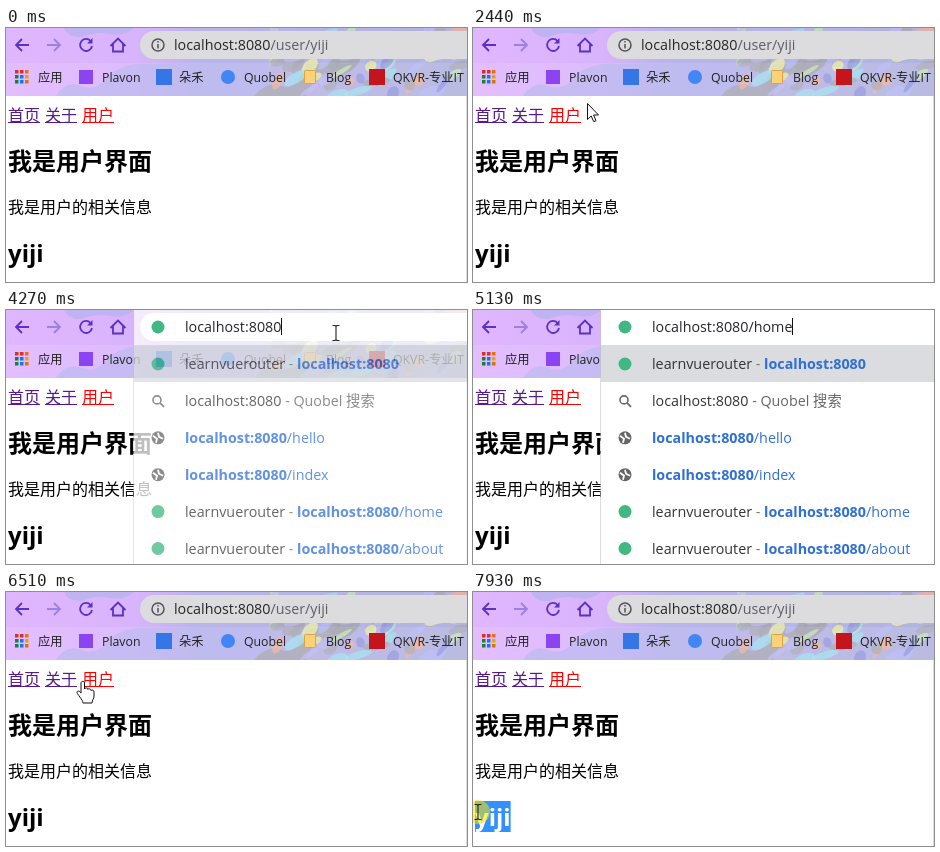
These frames come from a looping animation (461 px wide and 254 px high, 7990 ms). An HTML page:

```html
<!DOCTYPE html>
<html lang="zh">
<head>
<meta charset="utf-8">
<title>Router demo</title>
<style>
html, body { margin: 0; width: 100%; height: 100%; overflow: hidden; background: #fff; }
svg { display: block; width: 461px; height: 254px; }
text { font-family: "Open Sans", "Noto Sans CJK SC", "Noto Sans CJK", sans-serif; white-space: pre; }
.mark { font-size: 12.3px; fill: #222; }
.addr { font-size: 14.3px; fill: #26262b; }
.row { font-size: 14.3px; fill: #333; }
.h { font-size: 24px; font-weight: 700; }
.p { font-size: 16px; }
</style>
</head>
<body>
<svg viewBox="0 0 461 254">
  <defs>
    <linearGradient id="sky">
      <stop offset="0" stop-color="#e0b6ff"/>
      <stop offset=".28" stop-color="#d8b4fc"/>
      <stop offset=".42" stop-color="#b9b4ea"/>
      <stop offset="1" stop-color="#b2b3de"/>
    </linearGradient>
    <clipPath id="bar"><rect width="461" height="68"/></clipPath>
    <clipPath id="cut"><rect id="cutBox" y="205" width="60" height="40"/></clipPath>
  </defs>

  <g clip-path="url(#bar)">
    <rect width="461" height="68" fill="url(#sky)"/>
    <path d="M58 0H128Q118 9 104 6T76 9Q62 10 58 0ZM50 68Q60 52 76 58T104 46Q122 34 140 36H262V68Z" fill="#b7b3ee" opacity=".75"/>
    <path d="M248 68Q262 52 276 58T300 36H352Q338 52 322 50T300 68Z" fill="#a5a5b0" opacity=".8"/>
    <g id="splash"></g>
    <rect y="35" width="461" height="33" fill="#fff" opacity=".1"/>
  </g>

  <g fill="none" stroke="#5a31c4" stroke-width="1.8">
    <path d="M23 17H10M16 11L10 17L16 23"/>
    <path d="M41 17H54M48 11L54 17L48 23" stroke="#9c80e2"/>
    <g id="reload">
      <path d="M84.6 13A6 6 0 1 0 86 18"/>
      <path d="M86.5 10V15.5H81Z" fill="#5a31c4" stroke="none"/>
    </g>
    <path id="stop" d="M75 12L85 22M85 12L75 22"/>
    <path d="M104.5 18L112 10.5L119.500 18M107 16V23.500H117V16"/>
  </g>

  <g id="marks"></g>

  <rect y="68" width="461" height="186" fill="#fff"/>
  <path d="M460.500 68V254" stroke="#dcdcdc"/>
  <g id="links"></g>
  <text id="title" class="h" x="2" y="142"></text>
  <text id="body" class="p" x="2" y="185"></text>
  <g id="user">
    <text id="name" class="h" x="2" y="234">yiji</text>
    <g id="nameSel" clip-path="url(#cut)">
      <rect id="nameBox" x="2" y="209" height="31" fill="#3390ff"/>
      <text class="h" x="2" y="234" fill="#fff">yiji</text>
    </g>
  </g>

  <g id="panel"></g>
  <rect id="pill" x="134" y="3" width="360" height="28" rx="14"/>
  <g id="info" fill="none" stroke="#55525c" stroke-width="1.5">
    <circle cx="152" cy="17" r="6"/>
    <path d="M152 16V20.500M152 13V14.600"/>
  </g>
  <circle id="site" cx="152" cy="17" r="6.500" fill="#41b883"/>
  <rect id="addrSel" y="7" height="19" fill="#a5c5f6"/>
  <text id="addr" class="addr" y="22"><tspan>localhost:8080</tspan><tspan id="path"></tspan></text>
  <path id="caret" stroke="#111"/>

  <circle id="press" r="12" fill="#f8e400" opacity=".55"/>
  <g id="pointer">
    <path id="arrow" d="M.5 .5V16.500L4.200 13L6.700 18.700L9 17.700L6.600 12H11.500Z" fill="#fff" stroke="#111"/>
    <path id="hand" d="M-2 2C-2-.2 1.500-.2 1.500 2V8C2 6.300 4.800 6.500 4.800 8.500C5.500 7.200 8 7.600 8 9.600C9 8.400 11 9 11 11V15C11 18 9 19 9 22H0C0 19-6 13-6 11.500C-6 9.500-3.500 9.500-2 12Z" fill="#fff" stroke="#111"/>
    <path id="beam" d="M-3.500-7.500H-1L0-6.500L1-7.500H3.500M0-6.500V6.500M-3.500 7.500H-1L0 6.500L1 7.500H3.500" fill="none" stroke="#222" stroke-width="1.100"/>
  </g>
</svg>
<script>
const LOOP = 7990;
const $ = id => document.getElementById(id);
const show = (id, on) => { $(id).style.display = on ? '' : 'none'; };
const set = (id, attrs) => { for (const k in attrs) $(id).setAttribute(k, attrs[k]); };
const within = (t, a, b) => t >= a && t < b;

// Paint splashes of the browser theme
let seed = 11;
const rnd = () => (seed = seed * 16807 % 2147483647) / 2147483647;
const paints = ['#b6b8f4', '#a4a4ae', '#edf0a4', '#a8a8b2', '#9fe0ee', '#bfb8f2', '#c6e6b4', '#8f94de', '#efb29a'];
function splash(x, y, rx, ry, color) {
  return `<ellipse cx="${x}" cy="${y}" rx="${rx}" ry="${ry}" fill="${color}" opacity=".75" transform="rotate(${-65 + rnd() * 60} ${x} ${y})"/>`;
}
let art = '';
for (let i = 0; i < 72; i++) {
  art += splash(268 + rnd() * 195, rnd() * 68, 4 + rnd() * 10, 2 + rnd() * 4, paints[i % paints.length]);
}
$('splash').innerHTML = art;

// Bookmarks
const square = (x, y, s, color) => `<rect x="${x}" y="${y}" width="${s}" height="${s}" fill="${color}"/>`;
const dot = (x, y, r, color) => `<circle cx="${x}" cy="${y}" r="${r}" fill="${color}"/>`;
const dots = ['#d93025', '#d93025', '#e8710a', '#188038', '#1a73e8', '#e8a30a', '#188038', '#1a73e8', '#d9730a'];
$('marks').innerHTML = dots.map((c, i) => square(9 + i % 3 * 5, 42 + (i / 3 | 0) * 5, 3.5, c)).join('')
  + square(73, 42, 14, '#8a45f0') + square(150, 41, 16, '#3576e6') + dot(222, 49, 7, '#4285f4')
  + '<rect x="298.500" y="42.500" width="11" height="13" rx="1" fill="#fbd27a" stroke="#dfa23c"/>'
  + square(363, 41, 16, '#c5151c')
  + [[32, '应用'], [96, 'Plavon'], [173, '朵禾'], [238, 'Quobel'], [320, 'Blog'], [387, 'QKVR-专业IT']]
    .map(([x, s]) => `<text class="mark" x="${x}" y="54">${s}</text>`).join('');

// Page links
const pages = {
  home: { title: '我是首页', body: '我是首页内容', path: '/home' },
  about: { title: '我是关于', body: '我是关于内容', path: '/about' },
  user: { title: '我是用户界面', body: '我是用户的相关信息', path: '/user/yiji' }
};
const links = [['home', 2, '首页'], ['about', 39, '关于'], ['user', 76, '用户']];
$('links').innerHTML = links.map(([id, x, s]) =>
  `<g id="link-${id}"><text class="p" x="${x}" y="93">${s}</text><rect x="${x}" y="94" width="32" height="1"/></g>`).join('');

// Suggestions
const host = '<tspan font-weight="700" fill="#2f6fd6">localhost:8080</tspan>';
const tail = s => `<tspan fill="#2f6fd6">${s}</tspan>`;
const named = 'learnvuerouter<tspan fill="#777"> - </tspan>' + host;
const rows = [
  ['site', named], ['find', 'localhost:8080<tspan fill="#666"> - Quobel 搜索</tspan>'],
  ['globe', host + tail('/hello')], ['globe', host + tail('/index')],
  ['site', named + tail('/home')], ['site', named + tail('/about')]
];
const icons = {
  site: y => dot(152, y, 6.5, '#41b883'),
  find: y => `<path d="M154 ${y + 2}L158 ${y + 6}" stroke="#666" stroke-width="1.800"/><circle cx="151" cy="${y - 1}" r="4" fill="none" stroke="#666" stroke-width="1.600"/>`,
  globe: y => dot(152, y, 6.5, '#666') + `<path d="M147 ${y - 2}L151 ${y + 1}L150 ${y + 5}M152 ${y - 5}L153 ${y - 1}L157 ${y + 1}" fill="none" stroke="#fff" stroke-width="1.800"/>`
};
$('panel').innerHTML = '<rect x="127.500" y="-10" width="350" height="280" rx="8" fill="#fff" stroke="#0002"/>'
  + '<rect x="128" y="35" width="333" height="37" fill="#dadce0"/>'
  + rows.map(([icon, s], i) => {
    const y = 54 + i * 36.9;
    return icons[icon](y) + `<text class="row" x="179" y="${y + 5}">${s}</text>`;
  }).join('');

// Pointer moves: start, end, steps, x, y, shape
const moves = [
  [230, 450, 4, 100, 164, 'arrow'],
  [620, 930, 5, 52, 92, 'arrow'],
  [1010, 1010, 1, 47, 85, 'hand'],
  [1640, 1880, 4, 80, 86, 'hand'],
  [2440, 2670, 4, 215, 40, 'arrow'],
  [2740, 2970, 4, 325, 14, 'beam'],
  [3050, 3120, 2, 289, 11, 'beam'],
  [3200, 3200, 1, 282, 12, 'beam'],
  [3270, 3430, 3, 269, 15, 'beam'],
  [3730, 3730, 1, 255, 15, 'beam'],
  [4050, 4270, 4, 330, 23, 'beam'],
  [4810, 4810, 1, 305, 31, ''],
  [5430, 5430, 1, 305, 31, 'arrow'],
  [5510, 5900, 6, 91, 97, 'arrow'],
  [5960, 6040, 2, 87, 88, 'hand'],
  [6510, 6510, 1, 77, 89, 'hand'],
  [6590, 6750, 3, 54, 91, 'hand'],
  [6910, 7140, 4, 66, 160, 'arrow'],
  [7220, 7370, 3, 38, 222, 'beam'],
  [7450, 7680, 4, 29, 214, 'beam'],
  [7750, 7930, 3, 5, 220, 'beam']
];
function pointerAt(t) {
  let x = 375, y = 275, shape = '';
  for (const [start, end, n, tx, ty, kind] of moves) {
    if (t < start) break;
    const step = n > 1 ? Math.floor((t - start) / ((end - start) / (n - 1)) + .02) + 1 : 1;
    const k = Math.min(step, n) / n;
    x += (tx - x) * k;
    y += (ty - y) * k;
    shape = kind;
  }
  return { x, y, shape };
}

const presses = [[1330, 1410], [2030, 2200], [2970, 3730], [6040, 6200], [7450, LOOP]];
const visits = [[0, 'user'], [1410, 'about'], [2200, 'user'], [5360, 'home'], [6200, 'user']];

// Character edge nearest to x, and the end of the text
function edges(el, x) {
  const n = el.getNumberOfChars();
  const list = Array.from({ length: n }, (_, i) => el.getStartPositionOfChar(i).x);
  const end = el.getEndPositionOfChar(n - 1).x;
  const near = [...list, end].reduce((a, b) => Math.abs(b - x) < Math.abs(a - x) ? b : a);
  return [near, end];
}

function draw(t) {
  const page = visits.filter(v => t >= v[0]).pop()[1];
  const view = pages[page];
  const { x, y, shape } = pointerAt(t);
  const pressed = presses.some(([a, b]) => within(t, a, b));

  const hot = within(t, 1330, 1410) ? 'about' : within(t, 2030, 2200) || within(t, 6040, 6200) ? 'user' : '';
  for (const [id] of links) set('link-' + id, { fill: id === page || id === hot ? '#f00' : '#551a8b' });
  $('title').textContent = view.title;
  $('body').textContent = view.body;
  show('user', page === 'user');
  show('nameSel', t >= 7450);
  if (t >= 7450) {
    const [from, to] = edges($('name'), x);
    set('cutBox', { x: from });
    set('nameBox', { width: to - 2 });
  }

  const focus = within(t, 2970, 5360);
  const typing = within(t, 4050, 5360);
  set('pill', { fill: focus ? '#fff' : '#dcdbde', stroke: focus && !typing ? '#86aaf0' : 'none', 'stroke-width': 2 });
  show('info', !typing);
  show('site', typing);
  set('addr', { x: typing ? 179 : 168 });
  $('path').textContent = !typing ? view.path : t < 4810 ? '' : t < 5130 ? '/' : '/home';
  set('path', { fill: focus ? '#26262b' : '#605d68' });
  const selecting = within(t, 2970, 4050);
  show('addrSel', selecting);
  show('caret', typing);
  if (focus) {
    const [from, to] = edges($('addr'), Math.max(x, 268));
    if (selecting) set('addrSel', { x: from, width: to - from });
    set('caret', { d: `M${Math.round(to) + .5} 8V25` });
  }

  show('panel', typing);
  set('panel', { opacity: t < 4120 ? 0 : t < 4200 ? .15 : t < 4270 ? .45 : t < 4350 ? .75 : 1 });
  const loading = within(t, 5360, 5510);
  show('reload', !loading);
  show('stop', loading);

  show('press', pressed);
  set('press', { cx: x, cy: y });
  set('pointer', { transform: `translate(${Math.round(x)} ${Math.round(y)})` });
  for (const id of ['arrow', 'hand', 'beam']) show(id, id === shape);
}

const begin = performance.now();
function tick() {
  draw((performance.now() - begin) % LOOP);
  requestAnimationFrame(tick);
}
tick();
</script>
</body>
</html>
```
